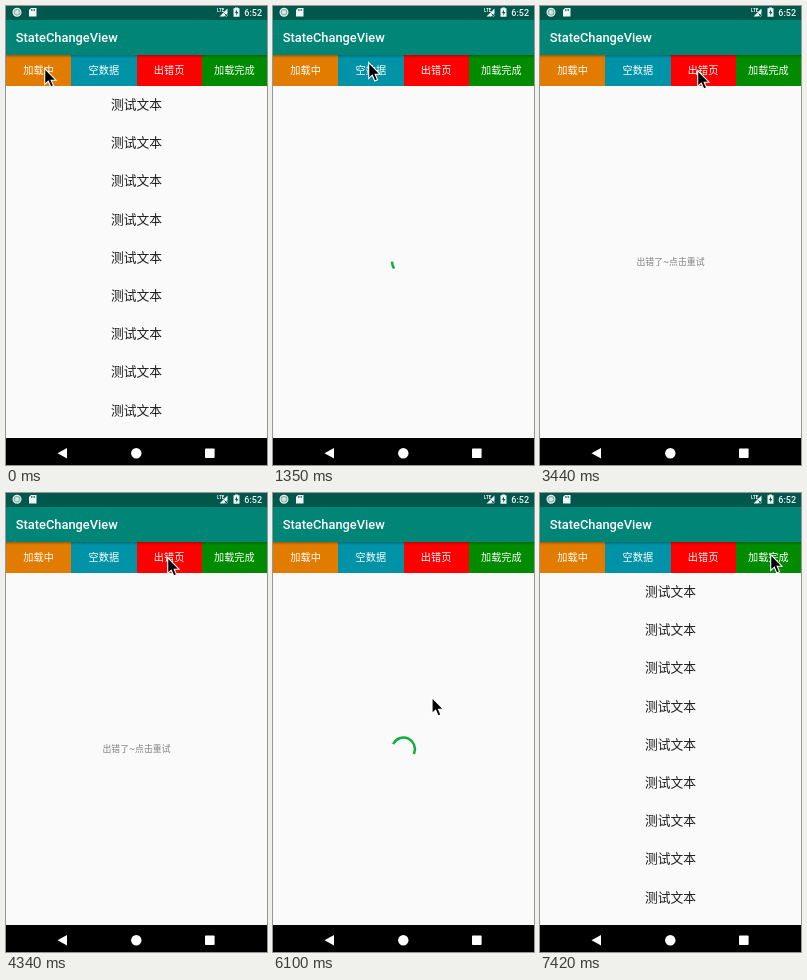
These frames come from a looping animation (261x459 px, 8000 ms). An HTML page:

```html
<!DOCTYPE html>
<html lang="zh-CN">
<head>
<meta charset="utf-8">
<title>StateChangeView</title>
<style>
  html, body { margin: 0; height: 100%; overflow: hidden; background: #fafafa; }
  svg { display: block; width: 100vw; height: 100vh; }
  text { font-family: Roboto, "Noto Sans CJK SC", "Noto Sans CJK", sans-serif; }
  .mid { text-anchor: middle; }
  .line { fill: none; stroke: #777; stroke-width: 2; stroke-linecap: round; stroke-linejoin: round; }
  .thin { stroke-width: 1.5; }
</style>
</head>
<body>
<svg viewBox="0 0 261 459">
  <defs>
    <linearGradient id="shade" x2="0" y2="1">
      <stop stop-opacity=".28"/>
      <stop offset="1" stop-opacity="0"/>
    </linearGradient>
  </defs>
  <rect width="261" height="459" fill="#fafafa"/>

  <g id="list" font-size="12.75" fill="#1c1c1c"></g>

  <path id="spinner" fill="none" stroke="#10ad3c" stroke-width="2.5" stroke-linecap="square"/>

  <g id="empty">
    <rect y="79" width="261" height="354" fill="#e9e9e9"/>
    <g class="line">
      <path d="M116.500 231V229.500Q116.500 227 119 227H144.500Q147 227 147 229.500V263.300M142 263.300H153.500"/>
      <path d="M126 268.300H113Q109.500 268.300 109.500 264.500V235Q109.500 232.500 112 232.500H138Q140.500 232.500 140.500 235V263"/>
      <path class="thin" d="M114.500 238H126M114.500 242.500H133M114.500 247.500H125"/>
      <circle cx="121" cy="258" r="6.300"/>
      <path d="M126 263L129 266"/>
      <path stroke-width="3.200" d="M129.500 266.300L134 270.300"/>
      <path class="thin" d="M93.500 268.300H101M104 268.300H110M134 268.300H141"/>
      <path class="thin" d="M104 223.500V228.500M101.500 226H106.500"/>
      <path stroke-width="1" d="M99 255.500V258.500M97.500 257H100.500M166 251.500V254.500M164.500 253H167.500"/>
      <circle class="thin" cx="95" cy="239" r="2.400"/>
      <circle class="thin" cx="158" cy="233" r="2.400"/>
    </g>
    <text class="mid" x="130.500" y="286.600" font-size="10.160" fill="#999">这里空空如也~</text>
  </g>

  <text id="error" class="mid" x="130.500" y="259.300" font-size="8.900" fill="#808080">出错了~点击重试</text>

  <rect width="261" height="14" fill="#00574b"/>
  <rect y="14" width="261" height="35" fill="#008577"/>
  <text x="9.800" y="36" font-size="12.850" font-weight="500" fill="#fff">StateChangeView</text>
  <g id="tabs" font-size="10.160" fill="#fff"></g>
  <rect y="49" width="261" height="3" fill="url(#shade)"/>

  <g fill="#f0f6f5">
    <circle cx="11" cy="6.200" r="3.900" fill="#7fa9a2" stroke="#e6f0ee" stroke-width="1.200"/>
    <circle cx="11" cy="6.200" r="2.200" fill="#d5e5e2"/>
    <path d="M25 2H30.500V10.500H23V4Z"/>
    <path d="M25.500 3V5M27 3V5M28.500 3V5" stroke="#00574b" stroke-width=".7"/>
    <text x="211" y="5.600" font-size="4.500" font-weight="700">LTE</text>
    <path d="M221.500 2.500V10.500H213.500Z"/>
    <path d="M218.500 7.500L222 11M222 7.500L218.500 11" stroke="#00574b"/>
    <path d="M229 2.300V1.500H232V2.300H233.500V10.700H227.500V2.300Z"/>
    <path d="M231 3.500L229 7H230.300V9.500L232.300 6H231Z" fill="#00574b"/>
    <text x="238.300" y="9.500" font-size="9" font-weight="500">6:52</text>
  </g>

  <rect y="432" width="261" height="27"/>
  <g fill="#fff">
    <path d="M51.500 447.300L61 442V452.600Z"/>
    <circle cx="130.300" cy="447.300" r="5.200"/>
    <rect x="199" y="442.500" width="9.600" height="9.600" rx=".8"/>
  </g>

  <path id="cursor" d="M.7 .6V16.500L4.300 13.200L6.800 19L9.600 17.800L7.200 12.200H12Z" stroke="#fff" stroke-width="1.100"/>
</svg>
<script>
const LOOP = 8000;
const $ = id => document.getElementById(id);

$('list').innerHTML = Array.from({ length: 9 }, (_, i) =>
  `<text class="mid" x="130.5" y="${103 + i * 38.2}">测试文本</text>`).join('');

$('tabs').innerHTML = [
  ['加载中', '#e27c00'], ['空数据', '#0093a7'], ['出错页', '#f00'], ['加载完成', '#008b00']
].map(([label, color], i) =>
  `<rect x="${Math.round(i * 65.25)}" y="49" width="66" height="31" fill="${color}"/>
   <text class="mid" x="${i * 65.25 + 32.6}" y="68.2">${label}</text>`).join('');

// Page shown from each tick on
const pages = [[0, 'list'], [1, 'spinner'], [13, 'empty'], [23, 'error'], [36, 'spinner'], [50, 'list']];

// Cursor path: tick, x, y
const route = [
  [0, 38, 62], [6, 38, 62], [7, 45, 60], [9, 95, 56], [10, 102, 61], [17, 102, 61],
  [18, 122, 61], [20, 151, 64], [21, 157, 64], [28, 157, 64], [29, 161, 64],
  [30, 171, 80], [31, 165, 140], [32, 145, 215], [33, 129, 251], [34, 130, 252],
  [39, 130, 252], [40, 136, 244], [43, 203, 124], [44, 217, 82], [45, 222, 66],
  [47, 230, 61], [60, 230, 61]
];

// The screen refreshes in ticks, slightly faster in the second part
const tickAt = t => t < 3150 ? Math.floor(t / 150) : 21 + Math.floor((t - 3145) / 147.2);
const timeOf = n => n < 21 ? n * 150 : 3150 + (n - 21) * 147.2;

// y of a cubic from (0,0) to (endX,1) with control points (x1,0), (x2,1)
function ease(x, x1, x2, endX) {
  if (x <= 0) return 0;
  if (x >= endX) return 1;
  let lo = 0, hi = 1;
  for (let i = 0; i < 20; i++) {
    const s = (lo + hi) / 2, r = 1 - s;
    if (3 * x1 * s * r * r + 3 * x2 * s * s * r + endX * s ** 3 < x) lo = s; else hi = s;
  }
  return lo * lo * (3 - 2 * lo);
}

function spinnerPath(elapsed) {
  const p = elapsed % 1333 / 1333;
  const base = p * 90 + elapsed / 4444 * 720;
  const tail = base + 270 * ease(p - 0.5, 0.2, 0.1, 0.5);
  const head = Math.max(base + 270 * ease(p, 0.2, 0.1, 0.5), tail + 4);
  const point = deg => {
    const a = deg * Math.PI / 180;
    return `${130.5 + 11.4 * Math.sin(a)} ${256 - 11.4 * Math.cos(a)}`;
  };
  return `M${point(tail)}A11.4 11.4 0 ${head - tail > 180 ? 1 : 0} 1 ${point(head)}`;
}

function cursorAt(n) {
  const i = route.findIndex(key => key[0] > n);
  const [n0, x0, y0] = route[i - 1], [n1, x1, y1] = route[i];
  const k = (n - n0) / (n1 - n0);
  return [x0 + (x1 - x0) * k, y0 + (y1 - y0) * k];
}

function draw(now) {
  const n = tickAt(now % LOOP);
  const page = pages.filter(([start]) => start <= n).pop()[1];
  for (const id of ['list', 'spinner', 'empty', 'error'])
    $(id).style.display = id === page ? '' : 'none';
  if (page === 'spinner')
    $('spinner').setAttribute('d', spinnerPath(timeOf(n) - (n < 36 ? -95 : 5225)));
  $('cursor').setAttribute('transform', `translate(${cursorAt(n)})`);
}

const origin = performance.now();
function frame() {
  draw(performance.now() - origin);
  requestAnimationFrame(frame);
}
frame();
</script>
</body>
</html>
```
